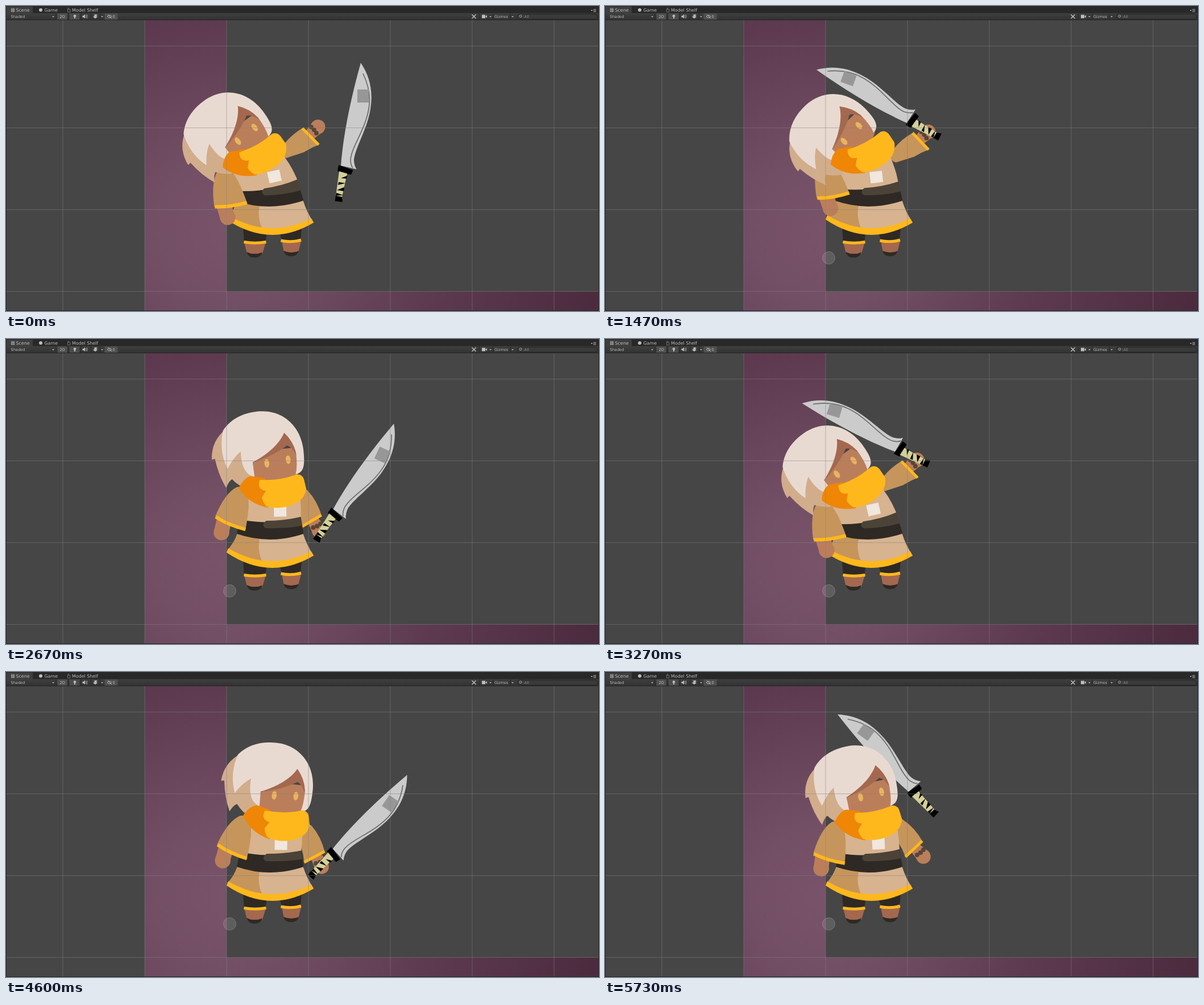
An HTML page that plays this animation: 1043x537 px, repeating every 5870 ms.

```html
<!DOCTYPE html>
<html lang="en">
<head>
<meta charset="utf-8">
<title>Scene view</title>
<style>
html, body { margin: 0; width: 100%; height: 100%; overflow: hidden; background: #464646; }
svg { display: block; width: 100vw; height: 100vh; }
text { font-family: "DejaVu Sans", sans-serif; fill: #bdbdbd; }
.tab { font-size: 7.9px; }
.tool { font-size: 6.6px; }
.icon { fill: #bdbdbd; }
.line { fill: none; stroke: #bdbdbd; }
.grid { stroke: #808080; stroke-opacity: .5; }
.hair { fill: #e9dad1; }
.hair-back { fill: #d2ad8c; }
.skin { fill: #bb7e5b; }
.skin-dark { fill: #a4684f; }
.cloth { fill: #d7b38f; }
.sleeve { fill: #c6955c; }
.gold { fill: #ffb81c; }
.trim { fill: none; stroke: #ffb81c; stroke-width: 6; }
.amber { fill: #ef8606; }
.dark { fill: #2e2924; }
.belt { fill: #4b4338; }
.eye { fill: #e9b45f; }
</style>
</head>
<body>
<svg viewBox="0 0 1043 537" preserveAspectRatio="none">
  <defs>
    <radialGradient id="wall" gradientUnits="userSpaceOnUse" cx="390" cy="395" r="650">
      <stop offset="0" stop-color="#785369"/>
      <stop offset=".2" stop-color="#734f66"/>
      <stop offset=".57" stop-color="#5d3a50"/>
      <stop offset="1" stop-color="#4d2b3f"/>
    </radialGradient>
    <linearGradient id="bar" x2="0" y2="1">
      <stop offset="0" stop-color="#3f3f3f"/>
      <stop offset="1" stop-color="#323232"/>
    </linearGradient>
  </defs>

  <rect width="1043" height="537" fill="#464646"/>
  <path fill="url(#wall)" d="M244 25H388V503H1042V536H244Z"/>

  <g id="legs">
    <path class="dark" d="M417 390H460L456 417H419ZM482 400 520 390 518 414H485Z"/>
    <path class="skin-dark" d="M419 416H457L451 436H424ZM485 414H519L514 434H489Z"/>
    <path class="trim" stroke-width="5" style="stroke-width:5" d="M418.500 415.500Q438 419 457.500 415.500M483.500 413Q502 417 519 412"/>
    <path class="dark" d="M423 433Q437 440 451 433.500Q448 443 437 443Q426 443 423 433ZM488 431Q502 437 515 431Q512 441 501 440.500Q490 440 488 431Z"/>
  </g>

  <g id="armR">
    <circle class="skin" cx="560" cy="325" r="12.800"/>
    <path class="skin" d="M538 316 554 304 569 316 552 334Z"/>
    <g fill="#584537">
      <circle cx="549" cy="322" r="4"/><circle cx="555" cy="318" r="4"/><circle cx="560" cy="313" r="4"/>
    </g>
    <path class="sleeve" d="M506 268Q510 255 524 260Q545 274 559 299L529 327Q524 313 516 300Z"/>
    <path class="trim" style="stroke-width:5" d="M558 297.500 528.500 325.500"/>
  </g>

  <g id="sword">
    <path fill="#cbcbcb" d="M624 100C640 124 646 150 641 181C636 216 613 252 612 271Q612 280 616.500 287.500L589 281C593 228 606 164 624 100Z"/>
    <path fill="none" stroke="#6c6c6c" stroke-width="1.700" d="M628 119C637 138 642 158 638 181C632 218 607 249 606 271Q606 280 610 285"/>
    <rect fill="#979797" x="618" y="147" width="20" height="23"/>
    <path d="M585 280 610.500 289 607 297 583 291Z"/>
    <path fill="#d3cf98" d="M586 291 600 295 591 336 580 335Z"/>
    <path d="M600 299 589 303 599 304ZM585 310 597 312 584 315ZM595 319 582 324 594 326ZM581 329 593 333 580 334Z"/>
    <path d="M580 334 590.500 336 592 345 578.500 343.500Z"/>
  </g>

  <g id="torso">
    <path class="cloth" data-d="M425,262 L518,262 Q521,290 519,316 L523,344 Q529,363 541,381 Q462,420 388,375 Q402,358 407,343 L412,317 Q422,300 425,262Z"/>
    <path class="sleeve" data-d="M407,342 L446,352 Q441,374 453,397 Q420,393 389,372 Q402,358 407,342Z"/>
    <path class="gold" data-d="M391,368.500 Q463,411 537,374 L541,381.500 Q464,427 388,376Z"/>
    <path class="dark" data-d="M411,317 Q464,329 519,314 L523.500,343 Q464,363 406,343Z"/>
    <path class="belt" data-d="M458,320 Q490,320 518,314 L521,329 Q494,334 457,333 Q448,328 458,320Z"/>
    <rect id="patch" x="-11" y="-10" width="22" height="20" fill="#f0e7de"/>
  </g>

  <g id="armL">
    <path class="skin" d="M373 309 397 320 390 342 367 328Z"/>
    <circle class="skin" cx="379" cy="334.500" r="13.800"/>
    <path class="sleeve" d="M412 257Q390 266 370 306Q392 324 421 334Q426 318 430 294L432 264Q424 255 412 257Z"/>
    <path class="trim" d="M371 306.500Q393 323 421.500 332.500"/>
  </g>

  <g id="head">
    <path class="hair-back" d="M400 150Q372 168 370 201L375.500 200Q379 230 390 253Q396 241 402 239Q412 252 424 258L446 240 430 170Z"/>
    <path class="skin" d="M441 195H518L519.500 236Q517 250 480 252L441 246Z"/>
    <path class="skin-dark" d="M440 214 502 160 520 196 518 208Q512 193 504 190Q480 205 440 214Z"/>
    <path class="hair" d="M395 152C410 134 432 125 459 125C502 125 531 157 532 200C532 226 530 240 514 242Q519 228 518.500 204Q516 184 501.500 167C490 188 464 204 441 213L441.500 239Q419 232 422 192Q407 202 396 220C387 197 388 173 395 152Z"/>
    <ellipse class="eye" cx="465.500" cy="217.500" rx="4.300" ry="7.500"/>
    <ellipse class="eye" cx="503.500" cy="215" rx="4.300" ry="7.500"/>
  </g>

  <g id="scarf">
    <path class="amber" d="M437 238Q424 240 414 257Q428 286 462 296L480 270 460 244Z"/>
    <path class="gold" d="M452 246Q486 251 518 242Q529 243 530 256L532 269Q524 298 481 298Q468 297 459 293Q453 284 453 277L461 266Q450 264 449.500 255Q450 249 452 246Z"/>
  </g>

  <path class="grid" d="M100 25V536M244 25V536M388 25V536M532 25V536M676 25V536M820 25V536M964 25V536M1 70.500H1042M1 214.500H1042M1 358.500H1042M1 502.500H1042"/>
  <circle id="pointer" cx="393.500" cy="443.500" r="11" fill="#a0a0a0" fill-opacity=".27" stroke="#b4b4b4" stroke-opacity=".35"/>

  <g id="chrome">
    <rect width="1043" height="13" fill="#282828"/>
    <rect x="1" y="1" width="46" height="13" fill="#3e3e3e"/>
    <rect x="1" y="12.500" width="1041" height="12" fill="url(#bar)"/>
    <path fill="none" stroke="#252525" d="M0 24.500H1043M.5 13V536.500H1042.500V13"/>
    <path class="line" stroke-width=".9" d="M10.500 3.500V11M13.500 3.500V11M8.500 5.800H15.800M8.500 8.800H15.800"/>
    <text class="tab" x="17.500" y="10.200">Scene</text>
    <circle class="icon" cx="61" cy="7" r="3"/>
    <text class="tab" x="67.500" y="10.200">Game</text>
    <path class="line" stroke-width=".8" opacity=".6" d="M108.500 6H113V10.500H108.500ZM109 6V4H111.500"/>
    <text class="tab" x="116" y="10.200">Model Shelf</text>
    <text class="tool" x="8.500" y="21">Shaded</text>
    <rect x="90.500" y="13" width="17" height="11" fill="#505050"/>
    <text class="tool" x="94.500" y="21">2D</text>
    <rect x="112" y="13" width="17" height="11" fill="#4c4c4c"/>
    <circle class="icon" cx="121" cy="17.500" r="2.300"/>
    <rect class="icon" x="120" y="19.500" width="2" height="2.500"/>
    <path class="icon" d="M134.500 17H136.500L139 14.500V22L136.500 20H134.500Z"/>
    <path class="line" stroke-width=".8" d="M140 16Q142 18.300 140 21M142 15Q144 18.300 142 22"/>
    <path class="icon" d="M153 19 157 17 161 19 157 22ZM154 16 158 14.500 161 16 158 18Z"/>
    <rect x="173.500" y="13" width="23" height="11" fill="#505050"/>
    <path class="line" stroke-width=".9" d="M178 18.500Q182 14 186 18.500Q182 22.500 178 18.500M179 15 186 22"/>
    <text class="tool" x="187.500" y="21">0</text>
    <path class="icon" d="M81 18H85L83 20ZM167 18H171L169 20ZM850 18H854L852 20ZM889 18H893L891 20Z"/>
    <path class="line" stroke-width="1.500" d="M819.500 15 826.500 22M826.500 15 819.500 22"/>
    <path class="icon" d="M837 15.500H843V21.500H837ZM843.500 18 846 16V21L843.500 19Z"/>
    <text class="tool" x="859" y="21">Gizmos</text>
    <path stroke="#272727" d="M88 13V24M109.500 13V24M131.500 13V24M149.500 13V24M165.500 13V24M832.500 13V24M856.500 13V24M887 13V24"/>
    <rect x="899.500" y="14" width="141" height="9" rx="4.500" fill="#3a3a3a" stroke="#222"/>
    <circle class="line" cx="905" cy="17.800" r="2" stroke-width=".8"/>
    <text class="tool" x="909.500" y="21" style="fill:#8a8a8a">:All</text>
    <path class="line" stroke-width=".8" d="M1033 6H1038M1033 8H1038M1033 10H1038"/>
    <path class="icon" d="M1028.500 7H1032L1030.200 9Z"/>
  </g>
</svg>
<script>
const LOOP = 5870, STEP = 200 / 3, CYCLE = 497, START = 930, REST = 5130, HOLD = 128;
const $ = id => document.getElementById(id);

// Each pose: phase in ms, x, y, angle
const tracks = {
  head: [[0, 480, 215.5, -7.5], [103, 467.5, 215.5, -13.7], [128, 422, 226, -38.5],
    [225, 390, 236, -52], [316, 433, 224.5, -46], [419, 501, 220, 11.9], [491, 484, 216, -3]],
  scarf: [[0, 471, 268.5, -4], [103, 464, 267, -8], [128, 439, 268, -26],
    [225, 413, 277, -37], [316, 455, 264, -25], [419, 479.5, 265, 9], [491, 473, 268, 0]],
  armL: [[0, 394.5, 324, 27], [103, 394, 329.5, 19.4], [128, 395.5, 351, -5],
    [225, 386, 377, -18], [316, 401.5, 335, -7], [419, 400, 312, 24], [491, 395.5, 320.5, 29.6]],
  armR: [[0, 535.5, 325, 154], [103, 544, 313, 137], [128, 537, 229, 46],
    [225, 505, 245, 35], [316, 556.5, 237.5, 47], [419, 552.5, 329, 144.6], [491, 537, 326, 157]],
  sword: [[0, 567, 325, -40], [60, 597, 289, -81.9], [103, 545, 209, -135.4], [128, 520, 193, -155.3],
    [225, 468, 222, -170], [316, 541, 201, -152.3], [419, 588, 316, -58.8], [491, 570, 326, -40.9]],
  bend: [[0, -1], [103, -5], [128, -26], [225, -38], [316, -14], [419, 4], [491, 0]]
};

// Pivot and angle in which each part is drawn
const bind = {
  head: [484, 216, -3], scarf: [473, 268, 0], armL: [395.5, 320.5, 29.6],
  armR: [544, 313, 137], sword: [597, 289, -81.9]
};

// Before the motion runs, the sword jumps alone: time, phase
const jumps = [[0, 60], [130, 0], [270, 225], [330, 250], [400, 0], [600, 240], [730, 0]];

function sample(track, phase) {
  const keys = [...track, [CYCLE, ...track[0].slice(1)]];
  const i = keys.findIndex(k => k[0] > phase);
  const a = keys[i - 1], b = keys[i], f = (phase - a[0]) / (b[0] - a[0]);
  return a.slice(1).map((v, n) => v + (b[n + 1] - v) * f);
}

function place(id, phase) {
  const [x, y, a] = sample(tracks[id], phase), [ox, oy, oa] = bind[id];
  $(id).setAttribute("transform", `translate(${x} ${y}) rotate(${a - oa}) translate(${-ox} ${-oy})`);
}

// Turns a torso point about the waist, more so towards the neck
function bendPoint(x, y, angle) {
  const turn = angle * Math.max(0, Math.min(1, (345 - y) / 85));
  const r = turn * Math.PI / 180, c = Math.cos(r), s = Math.sin(r), dx = x - 465, dy = y - 350;
  return [465 + dx * c - dy * s, 350 + dx * s + dy * c, turn];
}

function bendTorso(angle) {
  for (const path of document.querySelectorAll("[data-d]")) {
    path.setAttribute("d", path.dataset.d.replace(/([\d.]+),([\d.]+)/g,
      (_, x, y) => bendPoint(+x, +y, angle).slice(0, 2).join(" ")));
  }
  const [x, y, turn] = bendPoint(483, 303, angle);
  $("patch").setAttribute("transform", `translate(${x} ${y}) rotate(${turn})`);
}

const frameTime = k => Math.round(k * STEP / 10) * 10;

function draw(t) {
  let k = Math.floor(t / STEP) + 1;
  while (frameTime(k) > t) k--;
  const time = frameTime(k), live = time >= START;
  const running = ((time - REST) % CYCLE + CYCLE) % CYCLE;
  const body = live ? running : HOLD;
  const blade = live ? running : jumps.filter(j => j[0] <= time).pop()[1];
  for (const id of ["head", "scarf", "armL", "armR"]) place(id, body);
  place("sword", blade);
  bendTorso(sample(tracks.bend, body)[0]);
  $("pointer").style.display = live ? "" : "none";
}

const begin = performance.now();
function tick() {
  draw((performance.now() - begin) % LOOP);
  requestAnimationFrame(tick);
}
tick();
</script>
</body>
</html>
```
